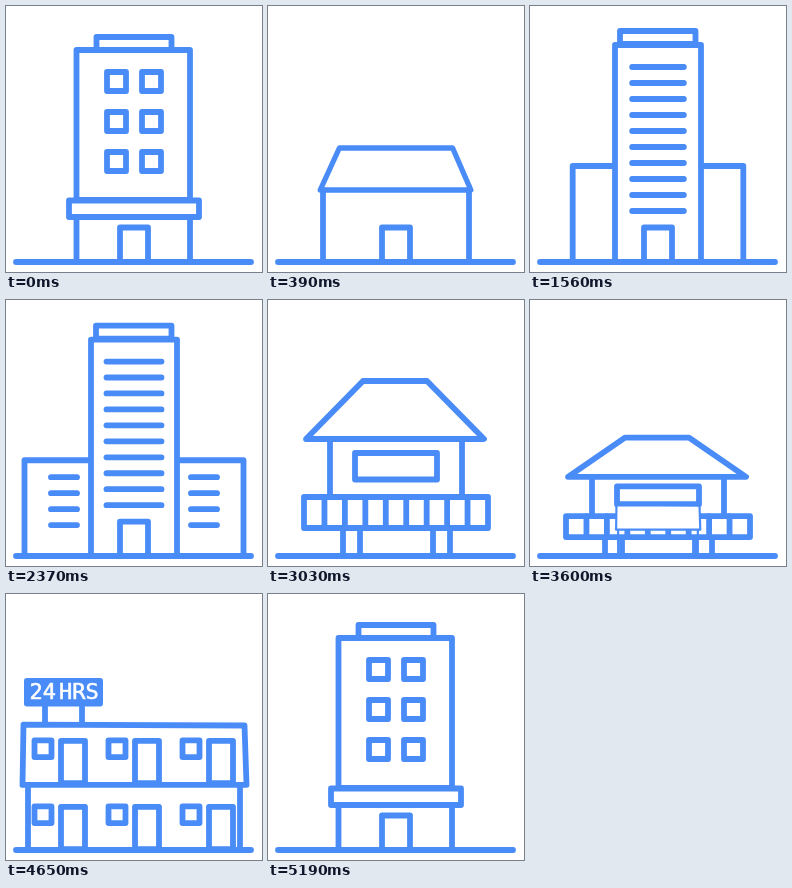
Recreate the animation shown at these times as an HTML page with a canvas. Size 256x266 px, loop 5.49 s.

```html
<!DOCTYPE html>
<html lang="en">
<head>
<meta charset="utf-8">
<title>Buildings</title>
<style>
html, body { margin: 0; width: 100%; height: 100%; overflow: hidden; background: #fff; }
canvas { display: block; width: 100vw; height: 100vh; }
</style>
</head>
<body>
<canvas id="stage" width="256" height="266"></canvas>
<script>
const ctx = document.getElementById('stage').getContext('2d');
const BLUE = '#4a8cf7', LOOP = 5490, GROUND = 256, EXIT = 220;

const outBack = (p, s) => {
  const q = Math.min(p, 1) - 1;
  return 1 + (s + 1) * q ** 3 + s * q * q;
};
const range = (n, f) => Array.from({ length: n }, (_, i) => f(i));

// Shapes
const open = (...pts) => ({ pts });
const shape = (...pts) => ({ pts, closed: true });
const box = (x1, y1, x2, y2) => shape(x1, y1, x2, y1, x2, y2, x1, y2);
const line = (x1, y1, x2, y2) => open(x1, y1, x2, y2);
const post = (x, y, end = GROUND) => line(x, y, x, end);
const fence = (x1, y1, x2, y2, gaps) => [
  box(x1, y1, x2, y2),
  ...range(gaps - 1, i => post(x1 + (x2 - x1) * (i + 1) / gaps, y1, y2))
];

// A part grows from its origin along the given axes
const part = (at, dur, bounce, axes, ox, oy, shapes, sign) =>
  ({ at, dur, bounce, axes, ox, oy, shapes, sign });

const pane = (x, y) => part(200, 280, 1.2, 'xy', x + 9.5, y + 9.5, [box(x, y, x + 19, y + 19)]);
const dormer = x => part(250, 260, 1.2, 'xy', x + 13, 208,
  [shape(x, 208, x, 180, x + 13, 171, x + 26, 180, x + 26, 208)]);
const slats = (x, w, y, n) => range(n, i => line(x, y + 16 * i, x + w, y + 16 * i));
const rooms = base => range(3, i => 74 * i).flatMap(x => [
  box(28.5 + x, base - 46, 45.5 + x, base - 28),
  box(55 + x, base - 45.5, 79 + x, base)
]);

const apartment = [
  part(0, 340, 1.1, 'y', 128, GROUND, [
    box(90.5, 31, 165.5, 44), box(70.5, 44, 184, 194),
    post(70.5, 211), post(184, 211), box(63, 194.5, 193, 211)
  ]),
  ...[66, 106, 146].flatMap(y => [pane(101, y), pane(136, y)])
];

const house = [
  part(0, 260, 1.1, 'y', 128, GROUND, [post(55, 184), post(201, 184)]),
  part(200, 240, 1.2, 'y', 87, 137, [box(76, 123.5, 98, 137)]),
  part(80, 300, 2.1, 'xy', 128, 184, [shape(66, 138, 190, 138, 210, 184, 45, 184)]),
  dormer(74), dormer(156),
  part(370, 210, 1.7, 'x', 91, GROUND, fence(30, 231, 91, 255, 4)),
  part(370, 210, 1.7, 'x', 164, GROUND, fence(164, 231, 225, 255, 4))
];

const tower = [
  part(420, 300, 1.1, 'x', 85, GROUND, [open(85, 160, 18.5, 160, 18.5, GROUND)]),
  part(420, 300, 1.1, 'x', 171, GROUND, [open(171, 160, 237.5, 160, 237.5, GROUND)]),
  part(0, 400, 1.2, 'y', 128, GROUND, [box(90, 25, 165.5, 38), box(85, 39, 171, GROUND)]),
  part(347, 350, 1.2, 'x', 128, GROUND, slats(100.5, 55, 61, 10)),
  part(700, 350, 1.2, 'x', 58, GROUND, slats(45, 26, 177, 4)),
  part(700, 350, 1.2, 'x', 198, GROUND, slats(185, 26, 177, 4))
];

const hut = [
  part(0, 320, 1.2, 'y', 128, GROUND, [
    ...[75, 92, 165, 182].map(x => post(x, 229)),
    post(62, 139, 228), post(194, 139, 228),
    shape(95, 81, 159, 81, 216, 139, 38, 139)
  ]),
  part(200, 260, 1.2, 'xy', 128, 166, [box(87, 153, 169, 179.5)]),
  part(270, 260, 1.5, 'x', 128, GROUND, fence(36, 197, 220, 228, 9))
];

const shop = [
  part(130, 270, 0.5, 'xy', 58, 121, [post(39, 101, 121), post(76, 101, 121)], true),
  part(0, 370, 0.9, 'xy', 128, GROUND, [
    post(22, 186), post(234, 186),
    shape(17.5, 121, 238.5, 122, 240.5, 186, 16.5, 186)
  ]),
  part(100, 280, 1.1, 'y', 128, GROUND, rooms(255)),
  part(368, 320, 1.2, 'xy', 128, 184, rooms(184))
];

const door = [part(0, 300, 1.1, 'y', 128, GROUND, [box(114, 221.5, 142, GROUND)])];

const scenes = [
  { parts: apartment, start: 4700, end: 60 },
  { parts: house, start: 230, end: 960 },
  { parts: tower, start: 1080, end: 2340 },
  { parts: hut, start: 2500, end: 3450 },
  { parts: shop, start: 3560, end: 4560 },
  { parts: door, start: 4850, end: 2340 }
];

function tracePath({ pts, closed }) {
  ctx.beginPath();
  for (let i = 0; i < pts.length; i += 2) ctx.lineTo(pts[i], pts[i + 1]);
  if (closed) ctx.closePath();
}

function drawSign() {
  ctx.fillStyle = BLUE;
  ctx.beginPath();
  ctx.roundRect(18, 71, 79, 30.5, 3);
  ctx.fill();
  ctx.fillStyle = ctx.strokeStyle = '#fff';
  ctx.lineWidth = 0.6;
  ctx.font = '22px "DejaVu Sans Mono", monospace';
  for (const [word, x] of [['24', 23.5], ['HRS', 53]]) {
    ctx.fillText(word, x, 94);
    ctx.strokeText(word, x, 94);
  }
}

function drawPart(p, time, squash) {
  if (time <= p.at) return;
  const k = Math.max(0.01, outBack((time - p.at) / p.dur, p.bounce));
  const sx = p.axes.includes('x') ? k : 1;
  const sy = p.axes.includes('y') ? k : 1;
  const place = () => {
    ctx.translate(0, GROUND * (1 - squash));
    ctx.scale(1, squash);
    ctx.translate(p.ox, p.oy);
    ctx.scale(sx, sy);
    ctx.translate(-p.ox, -p.oy);
  };
  for (const s of p.shapes) {
    ctx.save();
    place();
    tracePath(s);
    ctx.restore();
    // Stroked outside the transform so walls keep their weight
    if (s.closed) {
      ctx.fillStyle = '#fff';
      ctx.fill();
    }
    ctx.strokeStyle = BLUE;
    ctx.lineWidth = 5.8 * Math.min(1, Math.max(sx, sy));
    ctx.stroke();
  }
  if (p.sign) {
    ctx.save();
    place();
    drawSign();
    ctx.restore();
  }
}

function drawScene({ parts, start, end }, t) {
  const wrap = v => (v + LOOP) % LOOP;
  const age = wrap(t - start), life = wrap(end - start);
  const out = Math.max(0, (age - life) / EXIT);
  if (out >= 1) return;
  for (const p of parts) drawPart(p, age, 1 - out ** 3);
}

function frame() {
  const t = performance.now() % LOOP;
  ctx.fillStyle = '#fff';
  ctx.fillRect(0, 0, 256, 266);
  ctx.lineCap = ctx.lineJoin = 'round';
  for (const s of scenes) drawScene(s, t);
  tracePath(line(10, GROUND, 245, GROUND));
  ctx.strokeStyle = BLUE;
  ctx.lineWidth = 5.8;
  ctx.stroke();
  requestAnimationFrame(frame);
}
frame();
</script>
</body>
</html>
```
